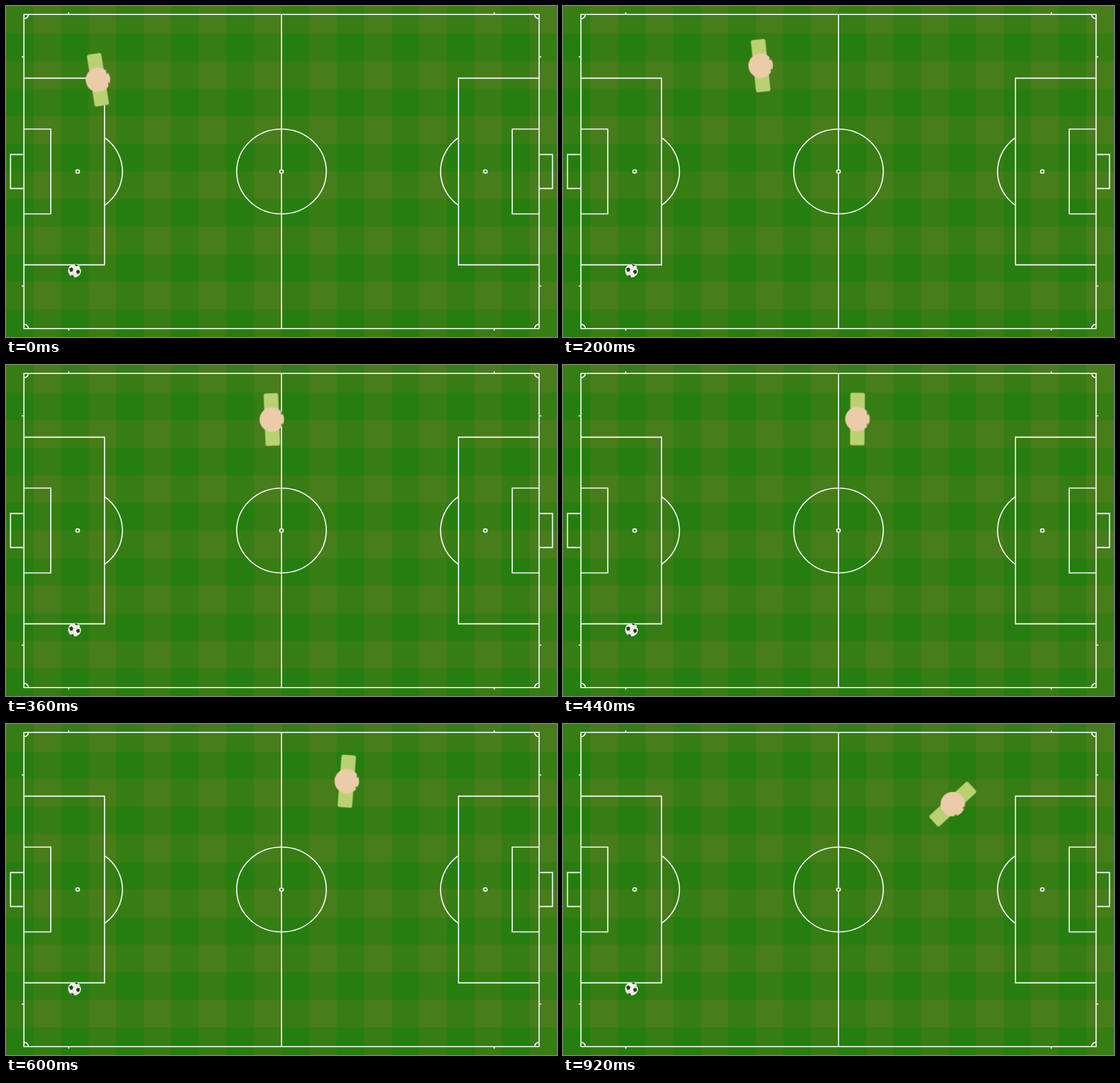
An HTML page that plays this animation: 800x480 px, repeating every 0.96 s.

```html
<!DOCTYPE html>
<html lang="en">
<head>
<meta charset="utf-8">
<title>Pitch</title>
<style>
html, body { margin: 0; width: 100%; height: 100%; overflow: hidden; background: #277e10; }
svg { display: block; width: 800px; height: 480px; }
.lines { fill: none; stroke: #fff; stroke-width: .25; }
</style>
</head>
<body>
<svg viewBox="0 0 800 480">
  <defs>
    <pattern id="grass" width="80" height="80" patternUnits="userSpaceOnUse">
      <rect width="80" height="80" fill="#367d14"/>
      <rect x="40" width="40" height="40" fill="#487d1b"/>
      <rect y="40" width="40" height="40" fill="#277e10"/>
    </pattern>
    <clipPath id="round"><circle r="9.4"/></clipPath>
    <!-- one half of the pitch, in yards from its centre -->
    <g id="half">
      <path d="M0-37H-57.5V37H0
        M-57.5-22h18v44h-18 M-57.5-10h6v20h-6 M-57.5-4h-3v8h3
        M-39.5-8A10 10 0 0 1-39.5 8
        M-56.5-37a1 1 0 0 1-1 1 M-56.5 37a1 1 0 0 0-1-1
        M-47.5-37v-.5 M-47.5 37v.5 M-57.5-27h-.5 M-57.5 27h-.5"/>
      <circle cx="-45.5" r=".4"/>
    </g>
  </defs>

  <rect width="800" height="480" fill="url(#grass)"/>

  <g class="lines" transform="translate(400 240) scale(6.504 6.154)">
    <use href="#half"/>
    <use href="#half" transform="scale(-1 1)"/>
    <path d="M0-37V37"/>
    <circle r="10"/>
    <circle r=".4" fill="#367d14"/>
  </g>

  <g transform="translate(99.5 384)">
    <circle r="9.4" fill="#f4f6ef"/>
    <g clip-path="url(#round)" fill="#2b3a22">
      <path d="M-7.6-3.4l3.4-1.6 2.4 2.2-1.2 3.8-3.6.4z"/>
      <path d="M2.2 1l2.2-2.4 3.2 1-.2 4-3.4 1.2z"/>
      <path d="M-.4-9.6h5l.6 2.4-2.6.8z"/>
      <path d="M-5.4 6.6l3.4-.2 1.6 3.4h-4z"/>
      <path d="M7.4-6l2 4-1.6-.8zM-9.6 1.6l1.4 2 .4 3z"/>
      <path d="M-1.8-2.4l4 1.4M-3 1.2l1.6 5.2M4 4l-5 3M2.4-6.6l2.2 5" fill="none" stroke="#aeb8a4" stroke-width=".6"/>
    </g>
  </g>

  <g id="player">
    <rect x="-10.5" y="-38" width="21" height="76" rx="2.8" fill="#bad172" stroke="#7fa650" stroke-width=".5"/>
    <circle r="17.8" fill="#ebcca8"/>
    <g fill="#4c7a34">
      <ellipse cx="14.7" cy="-8.8" rx="1.1" ry="2.9"/>
      <ellipse cx="14.7" cy="8.8" rx="1.1" ry="2.9"/>
    </g>
  </g>
</svg>
<script>
const LOOP = 960, STEP = 40;
const start = { x: 133.5, y: 107 };
const speed = { x: 850, y: -134 };
const accel = { x: -826, y: 313 };

const place = (axis, t) => start[axis] + speed[axis] * t + accel[axis] * t * t / 2;

// The player faces along the path, but can only turn so fast.
function heading(t) {
  const vx = speed.x + accel.x * t, vy = speed.y + accel.y * t;
  return Math.min(Math.atan2(vy, vx) * 180 / Math.PI, 26 + 134 * (t - 0.76));
}

function pose(ms) {
  const t = ms / 1000;
  return `translate(${place('x', t)}px, ${place('y', t)}px) rotate(${heading(t)}deg)`;
}

const steps = [];
for (let ms = 0; ms < LOOP; ms += STEP) {
  steps.push({ offset: ms / LOOP, transform: pose(ms), easing: 'steps(1, end)' });
}
steps.push({ offset: 1, transform: pose(LOOP - STEP) });

// The turn limit only matters late on the path.
for (const s of steps) {
  const t = s.offset * LOOP / 1000;
  if (t < 0.6) {
    const a = Math.atan2(speed.y + accel.y * t, speed.x + accel.x * t) * 180 / Math.PI;
    s.transform = `translate(${place('x', t)}px, ${place('y', t)}px) rotate(${a}deg)`;
  }
}

document.getElementById('player').animate(steps, { duration: LOOP, iterations: Infinity });
</script>
</body>
</html>
```
